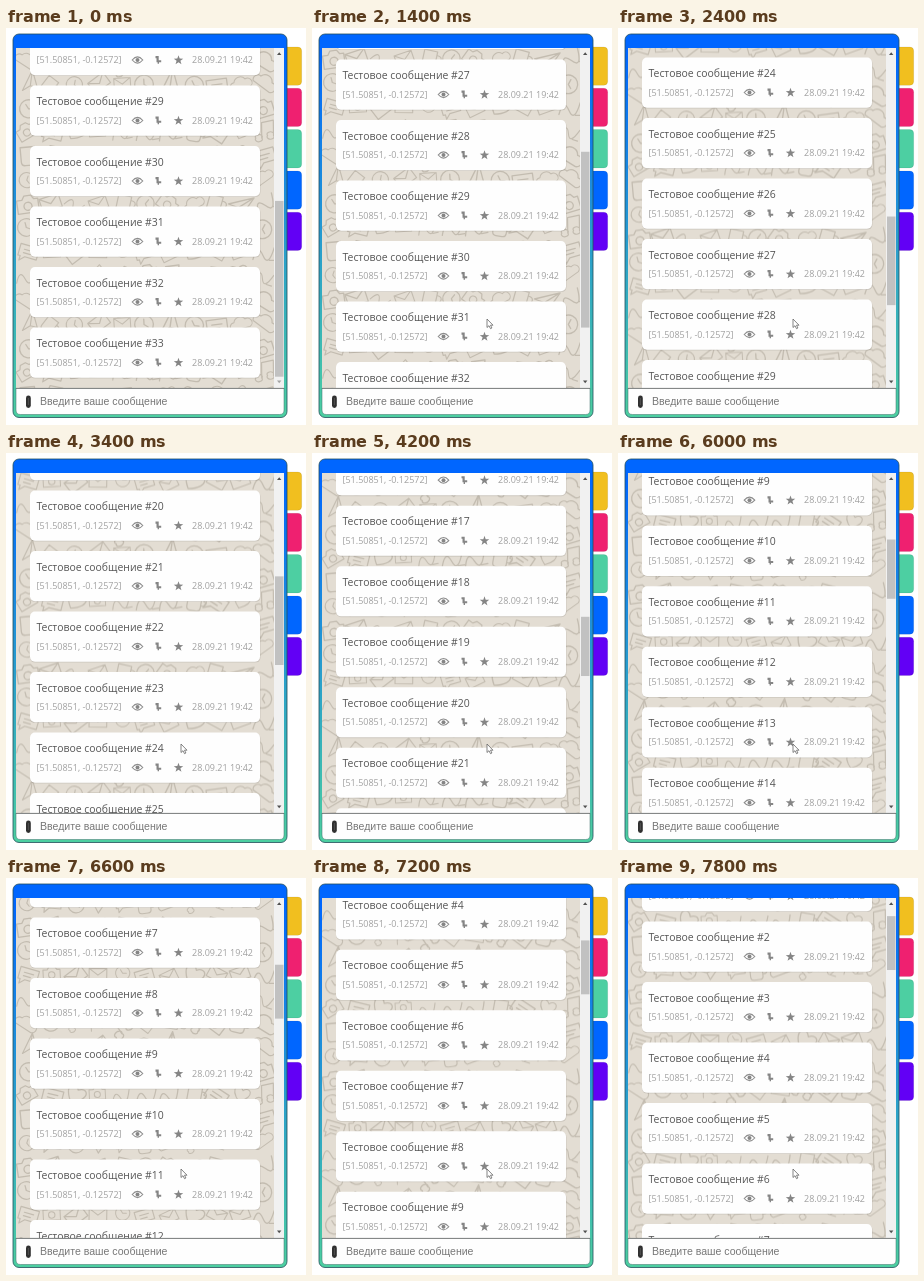
These frames come from a looping animation (300 px wide and 397 px high, 8000 ms). An HTML page:

```html
<!DOCTYPE html>
<html lang="ru">
<head>
<meta charset="utf-8">
<title>Chat scroll</title>
<style>
  html, body { margin: 0; width: 100%; height: 100%; overflow: hidden; background: #fff; }
  svg { display: block; width: 100vw; height: 100vh; }
  .title { font: 10.45px "Open Sans", "Noto Sans", sans-serif; fill: #555; }
  .meta { font: 9px "Open Sans", "Noto Sans", sans-serif; fill: #a0a0a0; }
  .hint { font: 10.55px "Liberation Sans", Arial, sans-serif; fill: #777; }
</style>
</head>
<body>
<svg viewBox="0 0 300 397">
  <defs>
    <linearGradient id="edge" x1="0" y1="0" x2="0" y2="1">
      <stop offset=".05" stop-color="#06f"/>
      <stop offset="1" stop-color="#4ccfa0"/>
    </linearGradient>
    <clipPath id="view"><rect x="10" y="20" width="258" height="340"/></clipPath>
    <pattern id="doodles" width="260" height="240" patternUnits="userSpaceOnUse">
      <rect width="260" height="240" fill="#e3ddd3"/>
      <g id="marks" fill="none" stroke="#c3bcb0" stroke-linecap="round" stroke-linejoin="round"/>
    </pattern>
    <g id="icons" fill="#858585">
      <path d="M126.2 35Q131.5 28.8 136.8 35Q131.5 41.2 126.2 35Z" fill="none" stroke="#8c8c8c" stroke-width="1.1"/>
      <circle cx="131.5" cy="35" r="2"/>
      <path d="M149.5 31H152.7V35.2H155.2V37.2H153V38.8H151.6V37.2H150.5V33.2H149.5Z"/>
      <path id="star"/>
    </g>
  </defs>

  <g id="tabs" stroke="#000" stroke-opacity=".15" stroke-width=".5"/>
  <rect x="7" y="6" width="274" height="383.5" rx="6" fill="url(#edge)" stroke="#24505c" stroke-width=".8"/>
  <path d="M10 360H278V382Q278 386.5 273.5 386.5H14.5Q10 386.5 10 382Z" fill="#fefefe" stroke="#3d6f68" stroke-width=".5"/>

  <g clip-path="url(#view)">
    <rect x="10" y="20" width="258" height="340" fill="url(#doodles)"/>
    <g id="list"/>
  </g>

  <rect x="268" y="20" width="10" height="340" fill="#f1f1f1"/>
  <rect id="thumb" x="269" width="8.5" fill="#c1c1c1"/>
  <path d="M271 27L273.2 24.2L275.4 27Z" fill="#505050"/>
  <path id="down" d="M271 352.5L273.2 355.3L275.4 352.5Z"/>

  <path d="M10 360.4H278" stroke="#666" stroke-width=".8"/>
  <rect x="20" y="367.5" width="4.8" height="12.5" rx="2.4" fill="#303030"/>
  <path d="M22.4 370V377" stroke="#666" stroke-width=".6"/>
  <text class="hint" x="34" y="377">Введите ваше сообщение</text>

  <path id="cursor" d="M175 291V299.5L177 297.7L178.5 300.7L179.9 300L178.5 297.2H181Z" fill="#fff" stroke="#666" stroke-width=".8"/>
</svg>

<script>
const NS = "http://www.w3.org/2000/svg";
const $ = id => document.getElementById(id);

function add(parent, tag, attrs, text) {
  const el = document.createElementNS(NS, tag);
  for (const key in attrs) el.setAttribute(key, attrs[key]);
  if (text) el.textContent = text;
  parent.append(el);
  return el;
}

const LOOP = 8000, STEP = 200;
const COUNT = 33, PAGE = 10, PITCH = 60.5, PAD = 10;
const VIEW = 340, TOP = 20, BAR_TOP = 30.7, BAR = 318;
const LOAD_AT = 176;

// Distance scrolled up from the end, as [time, px].
const path = [[0, 0], [800, 0], [1400, 95], [2400, 274.5], [3400, 524.5],
  [5200, 967], [6600, 1313], [7800, 1619.5], [8000, 1669]];

function scrolled(t) {
  const i = path.findIndex(p => p[0] > t);
  const [t0, d0] = path[i - 1], [t1, d1] = path[i];
  return d0 + (d1 - d0) * (t - t0) / (t1 - t0);
}

const contentHeight = n => n * PITCH + PAD;

function buildTabs() {
  ["#f1bf1f", "#ef2070", "#4dcfa2", "#0066ff", "#6200f5"].forEach((fill, i) =>
    add($("tabs"), "rect", { x: 276, y: 19 + i * 41.3, width: 19.7, height: 38.3, rx: 4, fill }));
}

function buildDoodles() {
  let seed = 29;
  const rand = () => (seed = seed * 16807 % 2147483647) / 2147483647;
  const shapes = [
    "M-8-5H8V5H-2L-6 9V5H-8Z M-4-1H4 M-4 2H2",
    "M-7 0A7 7 0 1 1 7 0A7 7 0 1 1-7 0 M0-4V0L3 2",
    "M0 7C-14-3-5-11 0-4C5-11 14-3 0 7Z",
    "M-8-5H8V6H-8Z L0 1L8-5",
    "M-9 4A4 4 0 0 1-6-3A6 6 0 0 1 5-4A4 4 0 0 1 8 4Z",
    "M-3 6V-7L7-9V4 M-3 6A3 2 0 1 1-8 6A3 2 0 1 1-3 6 M7 4A3 2 0 1 1 2 4A3 2 0 1 1 7 4",
    "M-6-6H5V5Q5 8 2 8H-3Q-6 8-6 5Z M5-3Q10-3 9 1Q8 4 5 3",
    "M-9 2L9-7L3 8L-1 3Z M-1 3L9-7",
    "M-8-4H-4L-2-7H3L5-4H8V6H-8Z M-3 1A3 3 0 1 1 3 1A3 3 0 1 1-3 1",
    "M-9 5Q-5-8-1 2T8-4 M4 6H9"
  ];
  const cols = 11, rows = 10, w = 260 / cols, h = 240 / rows;
  for (let row = 0; row < rows; row++)
    for (let col = 0; col < cols; col++) {
      const x = (col + .5) * w + rand() * 4 - 2, y = (row + .5) * h + rand() * 4 - 2;
      const turn = rand() * 80 - 40, size = 1 + rand() * .35;
      add($("marks"), "path", {
        d: shapes[Math.floor(rand() * shapes.length)],
        transform: `translate(${x} ${y}) rotate(${turn}) scale(${size})`
      });
    }
}

function buildStar() {
  const points = Array.from({ length: 10 }, (_, i) => {
    const r = i % 2 ? 2 : 5, a = i * Math.PI / 5;
    return [172.5 + r * Math.sin(a), 35.2 - r * Math.cos(a)].join(" ");
  });
  $("star").setAttribute("d", `M${points.join("L")}Z`);
}

function buildMessage(n) {
  const g = add($("list"), "g", { transform: `translate(0 ${n * PITCH})` });
  add(g, "rect", { x: 24, y: .8, width: 230.5, height: 50.3, rx: 5, fill: "#000", opacity: .1 });
  add(g, "rect", { x: 24, width: 230, height: 50.2, rx: 5, fill: "#fefefe" });
  add(g, "text", { class: "title", x: 30.5, y: 19.7 }, `Тестовое сообщение #${n}`);
  add(g, "text", { class: "meta", x: 30.5, y: 38.2 }, "[51.50851, -0.12572]");
  add(g, "use", { href: "#icons" });
  add(g, "text", { class: "meta", x: 186, y: 38.2 }, "28.09.21 19:42");
}

function render(t) {
  const dist = scrolled(t);
  let loaded = PAGE;
  const room = () => contentHeight(loaded) - VIEW - dist;
  while (loaded < COUNT && room() < LOAD_AT) loaded = Math.min(COUNT, loaded + PAGE);

  const total = contentHeight(loaded);
  const shift = TOP + VIEW - PITCH * (COUNT + 1) + dist;
  $("list").setAttribute("transform", `translate(0 ${shift})`);
  $("doodles").setAttribute("patternTransform", `translate(10 ${TOP + dist})`);
  $("thumb").setAttribute("y", BAR_TOP + room() / total * BAR);
  $("thumb").setAttribute("height", VIEW / total * BAR);
  $("down").setAttribute("fill", dist ? "#505050" : "#a3a3a3");
  $("cursor").setAttribute("visibility", t < 600 ? "hidden" : "visible");
}

buildTabs();
buildDoodles();
buildStar();
for (let n = 1; n <= COUNT; n++) buildMessage(n);

const start = performance.now();
function tick() {
  const t = (performance.now() - start) % LOOP;
  render(Math.floor(t / STEP) * STEP);
  requestAnimationFrame(tick);
}
tick();
</script>
</body>
</html>
```
